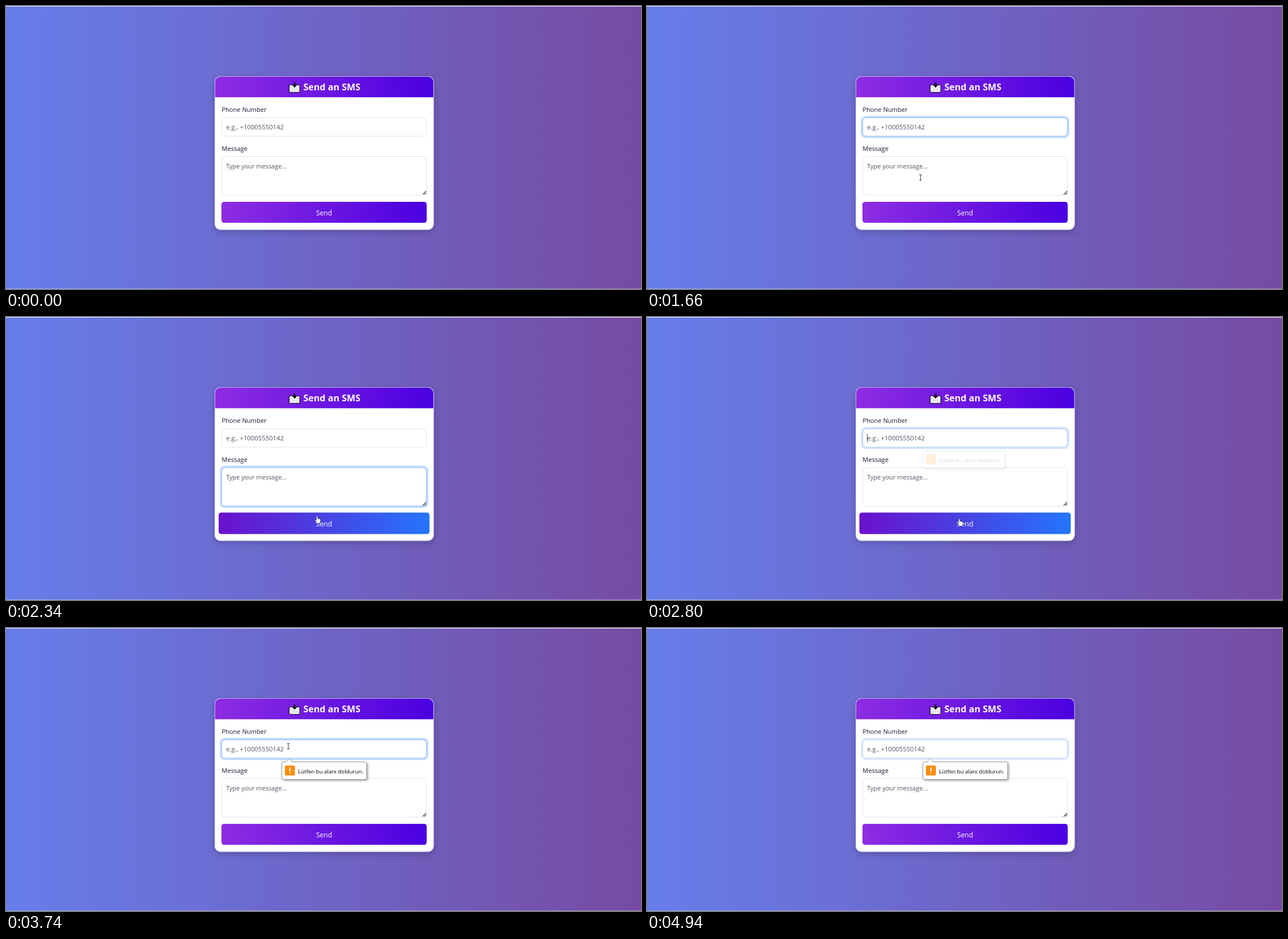
Recreate the animation shown at these times as an HTML page with a canvas. Size 1120 by 500 pixels, loop 5010 ms.

```html
<!DOCTYPE html>
<html lang="en">
<head>
<meta charset="utf-8">
<title>Send an SMS</title>
<style>
  html, body { margin: 0; width: 100%; height: 100%; overflow: hidden; }
  canvas { display: block; }
</style>
</head>
<body>
<canvas id="stage" width="1120" height="500"></canvas>
<script>
const ctx = document.getElementById('stage').getContext('2d');
const LOOP = 5010, STEP = 66.8, BLINK = 530;
const FONT = '"Open Sans", "Noto Sans", sans-serif';

const phone = { x: 380.5, y: 197.5, w: 361, h: 32.5 };
const message = { x: 380.5, y: 266, w: 361, h: 68 };
const button = { x: 380, y: 346, w: 362, h: 37 };

// when each control gains and loses the focus or the pointer
const phoneFocus = [[720, 1725], [2737, 4872]];
const messageFocus = [[1725, 2600]];
const hover = [2130, 3000];

// pointer strokes: start and end time, bend, end point
const entry = { x: 980, y: 488, t: 66 };
const strokes = [
  [66, 600, 200, 200, 405, 213],
  [1136, 1670, 465, 386, 482.5, 303],
  [1870, 2204, 530, 355, 548.5, 351.5],
  [2604, 2806, 550, 354, 551, 356.5],
  [2970, 3740, 333, 193, 498, 209],
  [3810, 4412, 1046, 493, 1045, 489]
];

const clamp = v => Math.max(0, Math.min(1, v));
const smooth = p => (p = clamp(p), p * p * (3 - 2 * p));
const easeOut = p => 1 - (1 - clamp(p)) ** 2;
const bend = (a, b, c, p) => a * (1 - p) ** 2 + 2 * b * p * (1 - p) + c * p * p;
const glowAt = (t, spans) => spans.reduce(
  (sum, [on, off]) => sum + easeOut((t - on) / 150) * (1 - smooth((t - off) / 150)), 0);
const caretAt = (t, spans) => spans.some(
  ([on, off]) => t >= on && t < off && Math.floor((t - on) / BLINK) % 4 % 2 === 0 && t - on < 4 * BLINK);
const inside = (r, x, y) => x >= r.x && x <= r.x + r.w && y >= r.y && y <= r.y + r.h;

function paint(shape, fill, stroke, width = 0.9) {
  if (fill) { ctx.fillStyle = fill; ctx.fill(shape); }
  if (stroke) { ctx.strokeStyle = stroke; ctx.lineWidth = width; ctx.stroke(shape); }
}

function box(x, y, w, h, r, fill, stroke, width) {
  const shape = new Path2D();
  shape.roundRect(x, y, w, h, r);
  paint(shape, fill, stroke, width);
  return shape;
}

const draw = (d, fill, stroke, width) => paint(new Path2D(d), fill, stroke, width);

function text(str, x, y, size, color, weight = 400) {
  ctx.font = `${weight} ${size}px ${FONT}`;
  ctx.fillStyle = color;
  ctx.fillText(str, x, y);
}

function gradient(x, w, from, to) {
  const g = ctx.createLinearGradient(x, 0, x + w, 0);
  g.addColorStop(0, from);
  g.addColorStop(1, to);
  return g;
}

function shadow(color, blur, dx, dy) {
  ctx.shadowColor = color;
  ctx.shadowBlur = blur;
  ctx.shadowOffsetX = dx;
  ctx.shadowOffsetY = dy;
}

function drawPage() {
  box(0, 0, 1120, 500, 0, gradient(0, 1120, '#667eea', '#764ba2'));
  box(0, 0, 1120, 1, 0, '#f4f4fb');
  box(0, 499, 1120, 1, 0, 'rgba(255,255,255,.35)');

  ctx.save();
  shadow('rgba(0,0,0,.2)', 12, 0, 4);
  box(368, 124, 386.5, 271.5, 10, '#fff');
  ctx.restore();
  box(368.5, 124.5, 385.5, 36.8, [10, 10, 0, 0], gradient(368, 386, '#8e2de2', '#4a00e0'));
  box(368.5, 124.5, 385.5, 270.5, 10, null, 'rgba(196,188,222,.75)');
  drawInbox();
  text('Send an SMS', 524.4, 149, 16.1, '#fff', 700);
  text('Phone Number', 380.3, 187, 11.1, '#1f1730');
  text('Message', 380.3, 256, 11.2, '#1f1730');
}

function drawInbox() {
  const ink = '#171320';
  box(499.5, 139.5, 18.6, 13, 1, '#f1eff4', ink, 1.2);
  draw('M500.5 152l8.5-7 8.5 7', null, '#b9b4c2', 0.7);
  draw('M500.5 140.5l8.5 8 8.5-8', '#fbfafc', '#b9b4c2', 0.7);
  draw('M507.5 135h3v5h2.6l-4.1 4.5-4.1-4.5h2.6z', ink);
}

function drawField(r, glow, hint, size, baseline, caret) {
  if (glow > 0) box(r.x - 1.9, r.y - 1.9, r.w + 3.8, r.h + 3.8, 7.5, null, `rgba(13,110,253,${0.25 * glow})`, 2.9);
  box(r.x, r.y, r.w, r.h, 6, '#fff', '#dee2e6');
  if (glow > 0) box(r.x, r.y, r.w, r.h, 6, null, `rgba(134,183,254,${glow})`);
  text(hint, 388.2, baseline, size, '#565064');
  if (caret) box(388, baseline - 11.5, 0.8, 15, 0, '#212529');
}

function drawButton(t) {
  const [on, off] = hover;
  const colors = t >= on && t < off ? ['#6a11cb', '#2575fc'] : ['#8e2de2', '#4a00e0'];
  const scale = 1 + 0.03 * (easeOut((t - on) / 300) - easeOut((t - off) / 300));
  const { x, y, w, h } = button;
  const cx = x + w / 2, cy = y + h / 2;
  ctx.save();
  ctx.translate(cx, cy);
  ctx.scale(scale, scale);
  ctx.translate(-cx, -cy);
  box(x, y, w, h, 4.5, gradient(x, w, ...colors));
  text('Send', 547, 369.5, 12, '#fff');
  ctx.restore();
}

function drawBubble(t) {
  const age = t - phoneFocus[1][0];
  if (age <= 0) return;
  const grow = clamp(age / 600);
  const w = 144 + 5.5 * grow;
  ctx.save();
  ctx.globalAlpha = clamp(age / 466);

  // shadow only outside the bubble, so that it stays white while fading in
  ctx.save();
  const outside = new Path2D();
  outside.rect(0, 0, 1120, 500);
  outside.roundRect(486.5, 236.5, w, 31, 3);
  ctx.clip(outside, 'evenodd');
  shadow('rgba(0,0,0,.4)', 4, 2, 2);
  box(486.5, 236.5, w, 31, 3, '#fff');
  ctx.restore();

  box(486.5, 236.5, w, 31, 3, '#fff', '#8a8a8e');
  draw('M494 237.2l5.5-5.7 5.5 5.7z', '#fff');
  draw('M494 236.5l5.5-5.2 5.5 5.2', null, '#8a8a8e', 0.8);
  box(492, 243, 17.5, 17.5, 1.5, '#ff8c00');
  draw('M499.5 246.5h2.6l-.4 6.5h-1.8z', '#fff');
  box(499.7, 254.6, 2.2, 2.2, 0.4, '#fff');
  text('Lütfen bu alanı doldurun.', 515, 256.5, 9.3 + 0.42 * grow, '#000');
  ctx.restore();
}

function pointerAt(t) {
  const last = strokes[strokes.length - 1];
  if (t < entry.t || t >= last[1]+ STEP / 2) return null;
  let { x, y } = entry;
  for (const [t0, t1, bx, by, x1, y1] of strokes) {
    const p = clamp((t - t0) / (t1 - t0));
    x = bend(x, bx, x1, p);
    y = bend(y, by, y1, p);
    if (p < 1) break;
  }
  return [x, y];
}

function drawPointer(t) {
  const pos = pointerAt(t);
  if (!pos) return;
  const [x, y] = pos;
  ctx.save();
  ctx.translate(x, y);
  ctx.lineJoin = 'round';
  if (inside(phone, x, y) || inside(message, x, y)) {
    draw('M0-4.5v9M-2.5-4.8h5M-2.5 4.8h5', null, '#2a2a2e');
  } else if (inside(button, x, y)) {
    draw('M-1.2 1Q0-1 1.2 1l.1 3.3 3.9.9q1.6.4 1.4 2.3-.1 2.5-1.4 5.5h-5.4q-1.3-2.5-3.4-5 .4-2 2.4-.2z', '#fff', '#1c1c24', 0.7);
  } else {
    draw('M.4.4v10.2l2.3-2.1 1.6 3.7 1.6-.7-1.6-3.6 3.2-.2z', '#fff', '#111', 0.7);
  }
  ctx.restore();
}

function render(t) {
  drawPage();
  drawField(phone, glowAt(t, phoneFocus), 'e.g., +10005550142', 11.3, 218, caretAt(t, phoneFocus));
  drawField(message, glowAt(t, messageFocus), 'Type your message...', 10.95, 287, caretAt(t, messageFocus));
  draw('M735 333l6-6M738.3 333l2.7-2.7', null, '#33333a', 1.1);
  drawButton(t);
  drawBubble(t);
  drawPointer(t);
}

function tick() {
  const t = performance.now() % LOOP;
  render(Math.min(74, Math.floor((t + 11) / STEP)) * STEP);
  requestAnimationFrame(tick);
}
tick();
</script>
</body>
</html>
```
